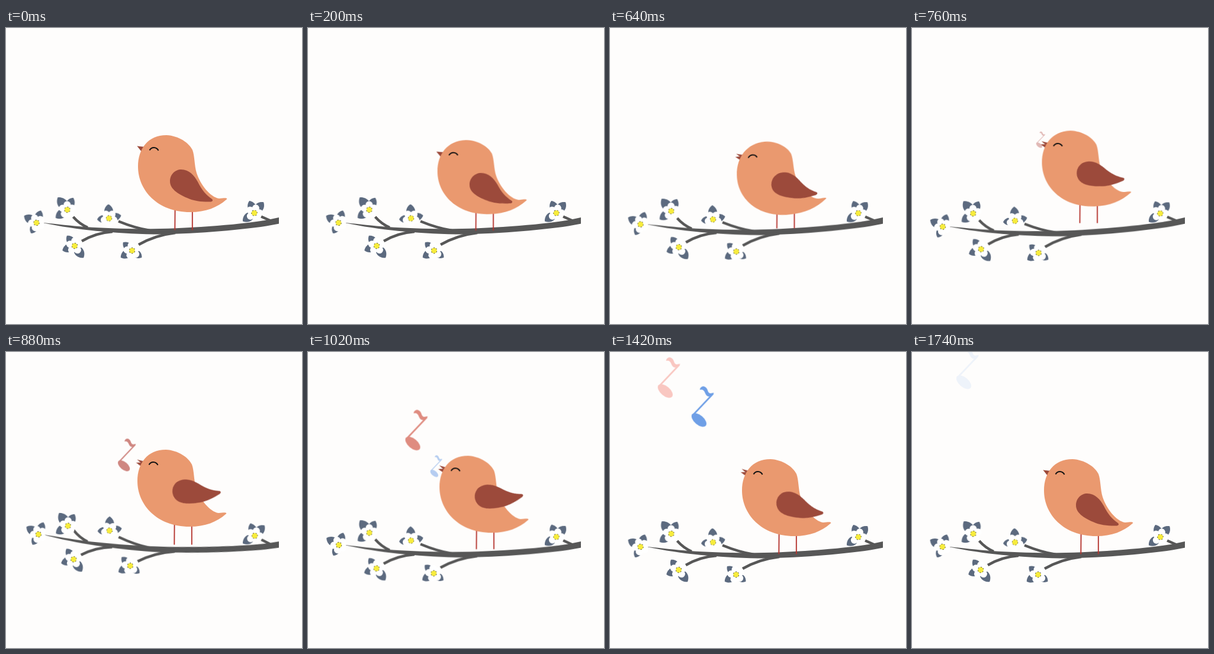
An HTML page without scripts for the animation above (1820 ms loop, 500 by 500 pixels).

```html
<!DOCTYPE html>
<html lang="en">
<head>
<meta charset="utf-8">
<title>Singing bird</title>
<style>
html, body { margin: 0; width: 100%; height: 100%; overflow: hidden; background: #fefdfc; }
svg { display: block; width: 100%; height: 100%; }

.bird, .legs, .wing, .upper, .lower, .branch, .sway {
  animation: 1.82s linear infinite;
}
.bird { animation-name: hop; transform-origin: 300px 300px; }
.legs { animation-name: feet; }
.wing { animation-name: flap; transform-origin: 296px 258px; }
.upper, .lower { animation-name: chirp; transform-origin: 234px 204px; }
.upper { --open: 12deg; }
.lower { --open: -20deg; }
.branch { animation-name: bend; transform-origin: 461px 325px; }
.sway { animation-name: sway; }
.red { animation: rise-red 1.82s linear infinite, fade-red 1.82s linear infinite; }
.blue { animation: rise-blue 1.82s linear infinite, fade-blue 1.82s linear infinite; }

/* crouch, jump, land, settle */
@keyframes hop {
  0% { transform: matrix(1, 0, 0, 1, 0, 0); animation-timing-function: ease-in-out; }
  25.27% { transform: matrix(1, -.088, .012, .935, -10, 10.6); animation-timing-function: ease-in; }
  35.16% { transform: matrix(1, -.09, .012, .975, -8, 5.6); animation-timing-function: ease-out; }
  48.35% { transform: matrix(1, 0, 0, 1, -1, -16); animation-timing-function: ease-in-out; }
  64.84% { transform: matrix(1, 0, 0, 1, -.7, 7); animation-timing-function: ease-in-out; }
  76.92%, 100% { transform: matrix(1, 0, 0, 1, 0, 0); }
}
@keyframes feet {
  0% { transform: translate(0, 0); animation-timing-function: ease-in-out; }
  25.27% { transform: translate(-4.5px, 1.5px); animation-timing-function: ease-in; }
  35.16% { transform: translate(-3.5px, -3px); animation-timing-function: ease-out; }
  48.35% { transform: translate(-1px, -16px); animation-timing-function: ease-in-out; }
  64.84% { transform: translate(-.7px, 1px); animation-timing-function: ease-in-out; }
  76.92%, 100% { transform: translate(0, 0); }
}
@keyframes flap {
  0%, 25.27% { transform: translate(0, 0) rotate(0deg); animation-timing-function: ease-in; }
  35.16% { transform: translate(4px, -2px) rotate(-11deg); }
  48.35% { transform: translate(5px, -7px) rotate(-31deg); animation-timing-function: ease-in-out; }
  64.84% { transform: translate(6px, -10px) rotate(-39deg); animation-timing-function: ease-in; }
  78.02% { transform: translate(4px, -3px) rotate(-17deg); animation-timing-function: ease-out; }
  89.01%, 100% { transform: translate(0, 0) rotate(0deg); }
}
@keyframes chirp {
  0%, 28.57% { transform: rotate(0deg); }
  35.16%, 48.35% { transform: rotate(calc(var(--open) * .75)); }
  64.84% { transform: rotate(var(--open)); }
  78.02% { transform: rotate(calc(var(--open) * .8)); }
  87.91%, 100% { transform: rotate(0deg); }
}
@keyframes bend {
  0%, 29.67% { transform: rotate(0deg); animation-timing-function: ease-in; }
  35.16% { transform: rotate(-.35deg); animation-timing-function: ease-out; }
  40.11% { transform: rotate(-1.3deg); animation-timing-function: ease-in-out; }
  48.35% { transform: rotate(2.95deg); animation-timing-function: ease-in-out; }
  59.34% { transform: rotate(-.15deg); }
  64.84%, 100% { transform: rotate(0deg); }
}
@keyframes sway {
  0%, 40.11% { transform: translate(0, 0); animation-timing-function: ease-in-out; }
  48.35% { transform: translate(var(--x), var(--y)); animation-timing-function: ease-in-out; }
  59.34%, 100% { transform: translate(0, 0); }
}
@keyframes rise-red {
  0%, 38.46% { transform: translate(224px, 196px) scale(.2); fill: #b5524e; stroke: #b5524e; }
  48.35% { transform: translate(204.5px, 174px) scale(.8); fill: #cf8781; stroke: #cf8781; }
  53.85% { transform: translate(190px, 143px) scale(1); }
  59.34% { transform: translate(174px, 115px) scale(1); }
  64.84% { transform: translate(156px, 90px) scale(1); fill: #f0917f; stroke: #f0917f; }
  71.43% { transform: translate(129px, 64px) scale(1); }
  78.02% { transform: translate(100px, 43px) scale(1); }
  86.81%, 100% { transform: translate(62px, 17px) scale(1); fill: #f88f8a; stroke: #f88f8a; }
}
@keyframes fade-red {
  0%, 38.46% { opacity: 0; }
  46%, 69.23% { opacity: 1; }
  86.81%, 100% { opacity: 0; }
}
@keyframes rise-blue {
  0%, 52.75% { transform: translate(224px, 200px) scale(.2); }
  58.24% { transform: translate(212px, 188px) scale(.75); }
  64.84% { transform: translate(196px, 163px) scale(1); }
  71.43% { transform: translate(178px, 125px) scale(1); }
  78.02% { transform: translate(157px, 92px) scale(1); }
  86.81% { transform: translate(127px, 58px) scale(1); }
  95.6%, 100% { transform: translate(94px, 28px) scale(1); }
}
@keyframes fade-blue {
  0%, 52.75% { opacity: 0; }
  59.34%, 80.22% { opacity: 1; }
  95.6%, 100% { opacity: .11; }
}
</style>
</head>
<body>
<svg viewBox="0 0 500 500">
  <defs>
    <clipPath id="edge"><rect width="461" height="500"/></clipPath>
    <path id="leaf" fill="#5c6a7f" d="M0 0C-11 -6 -10 -18 -1 -24C8 -19 11 -7 0 0Z"/>
    <g id="bloom">
      <g fill="#fff">
        <circle r="7"/>
        <circle r="6" cy="-8.5" transform="rotate(36)"/>
        <circle r="6" cy="-8.5" transform="rotate(108)"/>
        <circle r="6" cy="-8.5" transform="rotate(180)"/>
        <circle r="6" cy="-8.5" transform="rotate(252)"/>
        <circle r="6" cy="-8.5" transform="rotate(324)"/>
      </g>
      <circle r="4.8" fill="#f7ec3d" stroke="#4a4a3c" stroke-dasharray="1.8 3.2"/>
    </g>
    <g id="note">
      <ellipse rx="15" ry="8" transform="translate(-6.5 23) rotate(40)" stroke="none"/>
      <path d="M-17.5 15.5L17.5 -21.5" stroke-width="2.6"/>
      <path stroke="none" d="M-5 -28C-5 -33 1 -36 5 -32C9 -29 8 -22 13 -22C15 -22 17 -23 19 -23L15 -18C10 -15 6 -17 4 -22C2 -28 -1 -29 -5 -28Z"/>
    </g>
  </defs>

  <g clip-path="url(#edge)">
    <g class="branch">
      <path fill="#575757" d="M64 329C110 334 150 339 235 339.5C300 339 390 333 440 324.5L475 317V328L440 334.5C390 342 310 348.5 250 348.5C180 347 120 341 64 329.5Z"/>
      <g fill="none" stroke="#575757" stroke-width="4.4">
        <path d="M113.500 319Q124 331 138 337"/>
        <path d="M190 326.500Q218 338 243 342"/>
        <path d="M128 360Q152 346 180 344"/>
        <path d="M224 366Q252 350 286 346"/>
        <path d="M431 318.500L450 327"/>
      </g>

      <g transform="translate(51.5 329)"><g class="sway" style="--x:3px;--y:0px">
        <use href="#leaf" transform="rotate(-58)"/>
        <use href="#leaf" transform="rotate(22) scale(.92)"/>
        <use href="#leaf" transform="rotate(-151) scale(.84)"/>
        <use href="#bloom" transform="rotate(-58)"/>
      </g></g>
      <g transform="translate(103.5 307)"><g class="sway" style="--x:0px;--y:5px">
        <use href="#leaf" transform="rotate(-35) scale(1.1)"/>
        <use href="#leaf" transform="rotate(29) scale(.94)"/>
        <use href="#leaf" transform="rotate(-123)"/>
        <use href="#bloom" transform="rotate(-37)"/>
      </g></g>
      <g transform="translate(174 321.500)"><g class="sway" style="--x:0px;--y:-5px">
        <use href="#leaf"/>
        <use href="#leaf" transform="rotate(79) scale(.88)"/>
        <use href="#leaf" transform="rotate(-93) scale(.84)"/>
        <use href="#bloom"/>
      </g></g>
      <g transform="translate(116 368)">
        <use href="#leaf" transform="rotate(146) scale(1.05)"/>
        <use href="#leaf" transform="rotate(-108) scale(.92)"/>
        <use href="#leaf" transform="rotate(-35) scale(.9)"/>
        <use href="#bloom" transform="rotate(-35)"/>
      </g>
      <g transform="translate(213 376)"><g class="sway" style="--x:-1px;--y:-2px">
        <use href="#leaf" transform="rotate(-119) scale(.94)"/>
        <use href="#leaf" transform="rotate(-45) scale(.86)"/>
        <use href="#leaf" transform="rotate(128) scale(.84)"/>
        <use href="#bloom" transform="rotate(-47)"/>
      </g></g>
      <g transform="translate(419.500 312.500)">
        <use href="#leaf" transform="rotate(-20) scale(.92)"/>
        <use href="#leaf" transform="rotate(43)"/>
        <use href="#leaf" transform="rotate(-123)"/>
        <use href="#bloom" transform="rotate(-20)"/>
      </g>
    </g>
  </g>

  <path class="legs" d="M285.700 290L285.300 341.500M314.800 290V341.500" stroke="#b5352f" stroke-width="1.9"/>

  <g class="bird">
    <g fill="#9c4a3b">
      <path class="lower" d="M221.500 199.500L236 203L229 209Z"/>
      <path class="upper" d="M221.500 199.500L236 201L232 206Z"/>
    </g>
    <path fill="#ea996f" d="M223 234C223 204 240 181 271 181C292 182 309 194 315 206C319 217 318 232 322 245C328 264 345 286 360 288C365 288 369 287 372 287.500C374 288 373.500 289 372 290C357 303 338 311 311 311C256 311 223 274 223 234Z"/>
    <path d="M242.500 206.500C246 200.500 254 200.500 257.500 207" fill="none" stroke="#111" stroke-width="2"/>
    <path class="wing" fill="#9c4a3b" d="M277 259C277 247 286 239 296 239C309 239 318 249 324 260C331 274 338 282 348 289C350 291 349 293 346 293.500C335 294 318 293 306 287C289 280 277 271 277 259Z"/>
  </g>

  <g class="red"><use href="#note"/></g>
  <g class="blue" fill="#6f9fe6" stroke="#6f9fe6"><use href="#note"/></g>
</svg>
</body>
</html>
```
